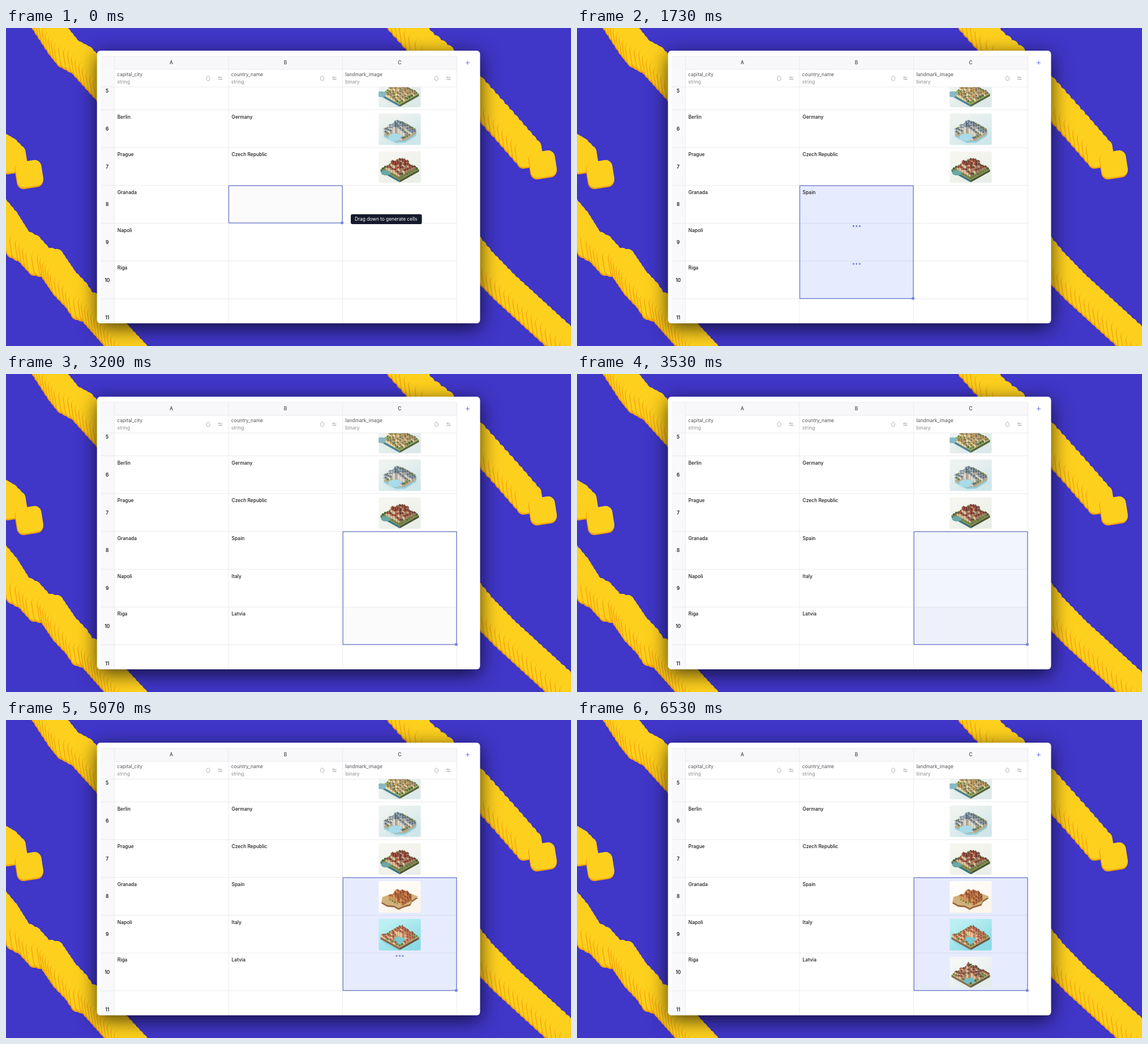
Animation of 998x561 px, one loop 6590 ms. Source, as an HTML page:

```html
<!DOCTYPE html>
<html lang="en">
<head>
<meta charset="utf-8">
<title>Generate cells</title>
<style>
html, body { margin: 0; width: 100%; height: 100%; overflow: hidden; background: #4036c8; }
svg { display: block; font: 8.45px Inter, Roboto, sans-serif; }
.card { fill: #fff; filter: drop-shadow(0 8px 17px rgba(0, 0, 0, .72)); }
.line { stroke: #e6e6eb; stroke-width: .8; fill: none; }
.icon { stroke: #a9a9ae; stroke-width: .9; fill: none; }
.mid { text-anchor: middle; }
.num { font-weight: 600; fill: #222; }
.cell { font-weight: 500; fill: #1b1b1d; }
</style>
</head>
<body>
<svg id="stage" width="998" height="561" viewBox="0 0 998 561"></svg>
<script>
const LOOP = 6590;
const COLS = [191.5, 393, 594.7, 796.3];
const ROW = 66.7;
const rowTop = n => 277.7 + (n - 8) * ROW;

let seed = 1;
const rnd = () => (seed = seed * 16807 % 2147483647) / 2147483647;
const text = (x, y, s, attrs = '') => `<text x="${x}" y="${y}" ${attrs}>${s}</text>`;
const box = (x, y, w, h, fill, attrs = '') =>
  `<rect x="${x}" y="${y}" width="${w}" height="${h}" fill="${fill}" ${attrs}/>`;
const poly = (points, fill, attrs = '') =>
  `<polygon points="${points.map(p => p.map(v => v.toFixed(1))).join(' ')}" fill="${fill}" ${attrs}/>`;

// Overlapping squares laid along a polyline
const tile = (x, y) => `<use href="#tile" x="${x.toFixed(1)}" y="${y.toFixed(1)}"/>`;
function trail(points, step) {
  let out = '';
  points.slice(1).forEach(([x2, y2], i) => {
    const [x1, y1] = points[i];
    const n = Math.max(1, Math.round(Math.hypot(x2 - x1, y2 - y1) / step));
    for (let k = 0; k < n; k++) out += tile(x1 + (x2 - x1) * k / n, y1 + (y2 - y1) * k / n);
  });
  return out + tile(...points.at(-1));
}

// Small isometric town on a slab, in a rounded picture
function town(row, o) {
  seed = row * 7919;
  const top = rowTop(row) + 6.3, cx = 695.5, cy = top + 32;
  const at = (u, v, z = 0) => [cx + (u - v) * 17, cy + (u + v) * 9.5 - z];
  const id = 'pic' + row;
  let out = box(658.2, top, 74.6, 56, `url(#sky${row})`);
  out += poly([at(-.7, 1.2, -4), at(.9, 1.3, -5), at(1.6, -.5, -3), at(1, -1)], o.shade, 'opacity=".6"');
  if (o.land) {
    const coast = o.land.map(([u, v]) => at(u, v));
    out += poly(coast.map(([x, y]) => [x, y + 3]), o.edge) + poly(coast, o.ground);
  } else {
    out += poly([at(-1, 1), at(1, 1), at(1, 1, -4), at(-1, 1, -4)], o.edge)
      + poly([at(1, 1), at(1, -1), at(1, -1, -4), at(1, 1, -4)], o.side)
      + poly([at(-1, -1), at(1, -1), at(1, 1), at(-1, 1)], o.ground);
  }
  const [wu, wv, wr] = o.pool;
  if (wr) {
    const [x, y] = at(wu, wv);
    out += `<ellipse cx="${x}" cy="${y}" rx="${wr * 24}" ry="${wr * 13}" fill="${o.water}"/>`;
  }
  const n = 8, spots = [];
  for (let i = 0; i < n; i++) for (let j = 0; j < n; j++) spots.push([i, j]);
  spots.sort((a, b) => a[0] + a[1] - b[0] - b[1]);
  for (const [i, j] of spots) {
    const u = (i + .5) / n * 2 - 1, v = (j + .5) / n * 2 - 1;
    const far = Math.hypot(u, v), chance = rnd();
    if (Math.hypot(u - wu, v - wv) < wr || far > o.reach) continue;
    const edge = Math.max(Math.abs(u), Math.abs(v)) > .8;
    if (chance < (edge ? .62 : .22)) {
      const [x, y] = at(u, v, 1.5);
      out += `<circle cx="${x}" cy="${y}" r="${1.4 + rnd()}" fill="${rnd() < .5 ? o.tree : '#66803f'}"/>`;
      continue;
    }
    const s = .11, spire = far < .55 && rnd() < .25;
    const h = 2 + rnd() * 2.5 + Math.max(0, 1 - far) * o.tall + (spire ? 3 : 0);
    const tip = at(u, v, h + (spire ? 7 : 2.5));
    const left = at(u - s, v + s, h), front = at(u + s, v + s, h), right = at(u + s, v - s, h);
    out += poly([left, front, at(u + s, v + s), at(u - s, v + s)], o.wall)
      + poly([front, right, at(u + s, v - s), at(u + s, v + s)], o.dim)
      + poly([left, front, tip], o.roof) + poly([front, right, tip], o.dark);
  }
  return `<clipPath id="${id}">${box(658.2, top, 74.6, 56, '#000', 'rx="3"')}</clipPath>
    <linearGradient id="sky${row}" x2=".7" y2="1"><stop offset=".2" stop-color="${o.bg}"/>
      <stop offset="1" stop-color="${o.shade}"/></linearGradient>
    <g id="town${row}" clip-path="url(#${id})">${out}</g>`;
}

const towns = [
  [5, { bg: '#f1f5f2', shade: '#dce9e8', ground: '#9eaa62', edge: '#4c8291', side: '#56663c', water: '#86b9c5',
    pool: [-.9, 1, .4], wall: '#efe0b4', dim: '#b89f72', roof: '#c49a57', dark: '#76705a', tree: '#47713d', tall: 4, reach: 2 }],
  [6, { bg: '#eef3ef', shade: '#cfe6ea', ground: '#b9ac8e', edge: '#91cfe0', side: '#7fbdcd', water: '#a9dbe8',
    pool: [.3, .75, .52], wall: '#e0d9cb', dim: '#a7a096', roof: '#8a9dab', dark: '#566a7b', tree: '#73845f', tall: 7, reach: 1.15,
    land: [[-1.1, -.7], [-.6, -1.1], [.6, -1.1], [1.1, -.6], [1.15, .6], [.7, 1.1], [-.5, 1.15], [-1.1, .5]] }],
  [7, { bg: '#f6f6f0', shade: '#eaeee8', ground: '#858a52', edge: '#39757a', side: '#4d5631', water: '#69a9a5',
    pool: [-.4, 1.05, .35], wall: '#dfc29f', dim: '#9c775f', roof: '#a9513f', dark: '#683a33', tree: '#3f6637', tall: 7, reach: 2 }],
  [8, { bg: '#fffdf9', shade: '#fbf5ec', ground: '#d2b27c', edge: '#99673d', side: '#99673d', water: '#d2b27c',
    pool: [0, 0, 0], wall: '#d99a5f', dim: '#a4603a', roof: '#c7713e', dark: '#89472d', tree: '#a39550', tall: 7, reach: .8,
    land: [[-1.1, .7], [-.9, -.1], [-.4, -.5], [.1, -1.1], [.7, -1.2], [.75, -.5], [1, -.1], [.8, .5], [.8, .9], [.3, .9], [-.1, 1.2], [-.7, 1.2]] }],
  [9, { bg: '#bceff2', shade: '#8adbe5', ground: '#c5a474', edge: '#8b6a4c', side: '#70563f', water: '#72cad4',
    pool: [.3, .35, .5], wall: '#edc69a', dim: '#b9835f', roof: '#c9785a', dark: '#945040', tree: '#6c8546', tall: 5, reach: 2 }],
  [10, { bg: '#f4f7f5', shade: '#e3eceb', ground: '#a5a06c', edge: '#877152', side: '#635b3e', water: '#70bdc8',
    pool: [.5, .6, .43], wall: '#dfbd94', dim: '#a58062', roof: '#a6584a', dark: '#684541', tree: '#577440', tall: 7, reach: 2 }],
];

const fields = [['A', 'capital_city', 'string'], ['B', 'country_name', 'string'], ['C', 'landmark_image', 'binary']];
const cities = [[6, 'Berlin', 'Germany'], [7, 'Prague', 'Czech Republic'],
  [8, 'Granada', 'Spain'], [9, 'Napoli', 'Italy'], [10, 'Riga', 'Latvia']];

const background = box(0, 0, 998, 561, '#4036c8')
  + trail([[58, -30], [66, -19], [94, 24], [110, 44], [134, 57], [179, 107], [200, 130]], 10)
  + trail([[680, -35], [695, -17], [736, 29], [770, 55], [800, 85], [826, 111], [885, 177], [924, 222]], 13)
  + tile(948, 241)
  + trail([[-12, 212], [0, 219], [13, 232]], 9) + tile(41, 258)
  + trail([[-25, 315], [0, 345], [22, 380], [41, 390], [60, 411], [80, 415], [103, 449], [124, 471],
    [136, 489], [152, 494], [191, 538], [216, 565], [235, 585]], 9)
  + trail([[820, 390], [843, 418], [880, 456], [960, 529], [1020, 583]], 11);

let grid = box(167, 50, 24.5, 471, '#f9f9fb');
for (let n = 5; n <= 11; n++) {
  grid += `<path class="line" d="M167 ${rowTop(n)}H796.3"/>`
    + text(178.7, n === 5 ? 114 : rowTop(n) + 36.5, n, 'class="mid num"');
}
grid += `<path class="line" d="${COLS.map(x => `M${x} 50V521`).join('')}"/>`;

let header = box(191.5, 41, 604.8, 63, '#fff') + box(167, 50, 629.3, 23, '#f8f8fa')
  + box(167, 73, 24.5, 31, '#f9f9fb')
  + `<path class="line" d="M167 50H796.3M191.5 73H796.3M167 104H796.3${COLS.map(x => `M${x} 50V104`).join('')}"/>`;
fields.forEach(([letter, name, type], i) => {
  const x = COLS[i];
  header += text(x + 100.6, 64.4, letter, 'class="mid" font-weight="500" fill="#444"')
    + text(x + 4.8, 85.4, name, 'fill="#55555a"') + text(x + 4.8, 97.8, type, 'fill="#8d8d93"')
    + `<g class="icon" transform="translate(${x + 165.6} 88.8)">
        <path d="M0-4C2-4 3-1.2 3 .8 3 2.8 1.8 4 0 4S-3 2.8-3 .8C-3-1.2-2-4 0-4Z"/>
        <path d="M17.5-1.7H25M17.5 1.7H25"/>
        <circle cx="19.8" cy="-1.7" r="1.1" fill="#fff"/><circle cx="22.6" cy="1.7" r="1.1" fill="#fff"/></g>`;
});
header += '<path d="M812 61.3H819M815.5 57.8V64.8" stroke="#6f74dd" stroke-width="1.1"/>';

let content = '';
for (const [n, city, country] of cities) {
  const y = rowTop(n) + 15.2;
  content += text(196.8, y, city, 'class="cell"')
    + text(398.6, y, country, `class="cell" id="country${n}"`);
}
for (const [n, look] of towns) content += town(n, look);
for (const n of [8, 9, 10]) {
  content += `<g id="dots${n}" fill="#7385df">${[-5.5, 0, 5.5].map(dx =>
    `<circle cx="${dx}" cy="${rowTop(n) + 5}" r="1.6"/>`).join('')}</g>`;
}

document.getElementById('stage').innerHTML = `
  <defs>
    <g id="tile" transform="rotate(-9)">
      ${box(-24, -22.5, 47, 47, '#f5a50b', 'rx="12"')}${box(-22.5, -23.5, 46, 45.5, '#fed01e', 'rx="12"')}
    </g>
    <clipPath id="cardClip">${box(160.7, 40, 676.7, 481, '#000', 'rx="6"')}</clipPath>
  </defs>
  ${background}
  <rect class="card" x="160.7" y="40" width="676.7" height="481" rx="6"/>
  <g clip-path="url(#cardClip)">
    ${grid}
    <rect id="active" width="201.5" height="${ROW}" fill="#000" fill-opacity=".016"/>
    <rect id="range" width="200.6" fill="#5678f2" stroke="#7482cb" stroke-width="1.4"/>
    ${content}
    <circle id="handle" r="2.6" fill="#7587e6"/>
    ${header}
    <g id="tip">${box(609, 328.5, 125.6, 17.5, '#141a2b', 'rx="3"')}
      ${text(616, 340.2, 'Drag down to generate cells', 'fill="#fff" font-size="8.3"')}</g>
  </g>`;

const el = id => document.getElementById(id);
const set = (id, attrs) => Object.entries(attrs).forEach(([k, v]) => el(id).setAttribute(k, v));
const show = (id, on) => el(id).style.display = on ? '' : 'none';

// Each column: select first cell, drag over two more, load, fill in
const phases = [
  { col: 1, start: 0, drag: [500, 800], load: 870, dots: 1200, done: [1700, 1800, 1900] },
  { col: 2, start: 2130, drag: [2850, 3080], load: 3250, dots: 3600, done: [4900, 5050, 5200] },
];

function draw(t) {
  const p = phases[t < phases[1].start ? 0 : 1];
  const last = 8 + p.drag.filter(d => t >= d).length;
  const x = COLS[p.col], bottom = rowTop(last + 1);
  const tint = .15 * Math.min(1, Math.max(0, (t - p.load) / 530));
  set('range', { x: x + .5, y: rowTop(8) + .5, height: bottom - rowTop(8) - 1, 'fill-opacity': tint });
  set('active', { x, y: rowTop(last) });
  set('handle', { cx: x + 200.6, cy: bottom - .8 });
  set('tip', { transform: `translate(${(p.col - 1) * 201.8} 0)` });
  show('tip', t < p.drag[0] - 100);
  show('active', t < p.dots);
  [8, 9, 10].forEach((n, i) => {
    set('dots' + n, { transform: `translate(${x + 100.8} 0)` });
    show('dots' + n, t >= p.dots && t < p.done[i]);
    show('country' + n, t >= phases[0].done[i]);
    show('town' + n, t >= phases[1].done[i]);
  });
}

const began = performance.now();
function tick() {
  draw((performance.now() - began) % LOOP);
  requestAnimationFrame(tick);
}
tick();
</script>
</body>
</html>
```
